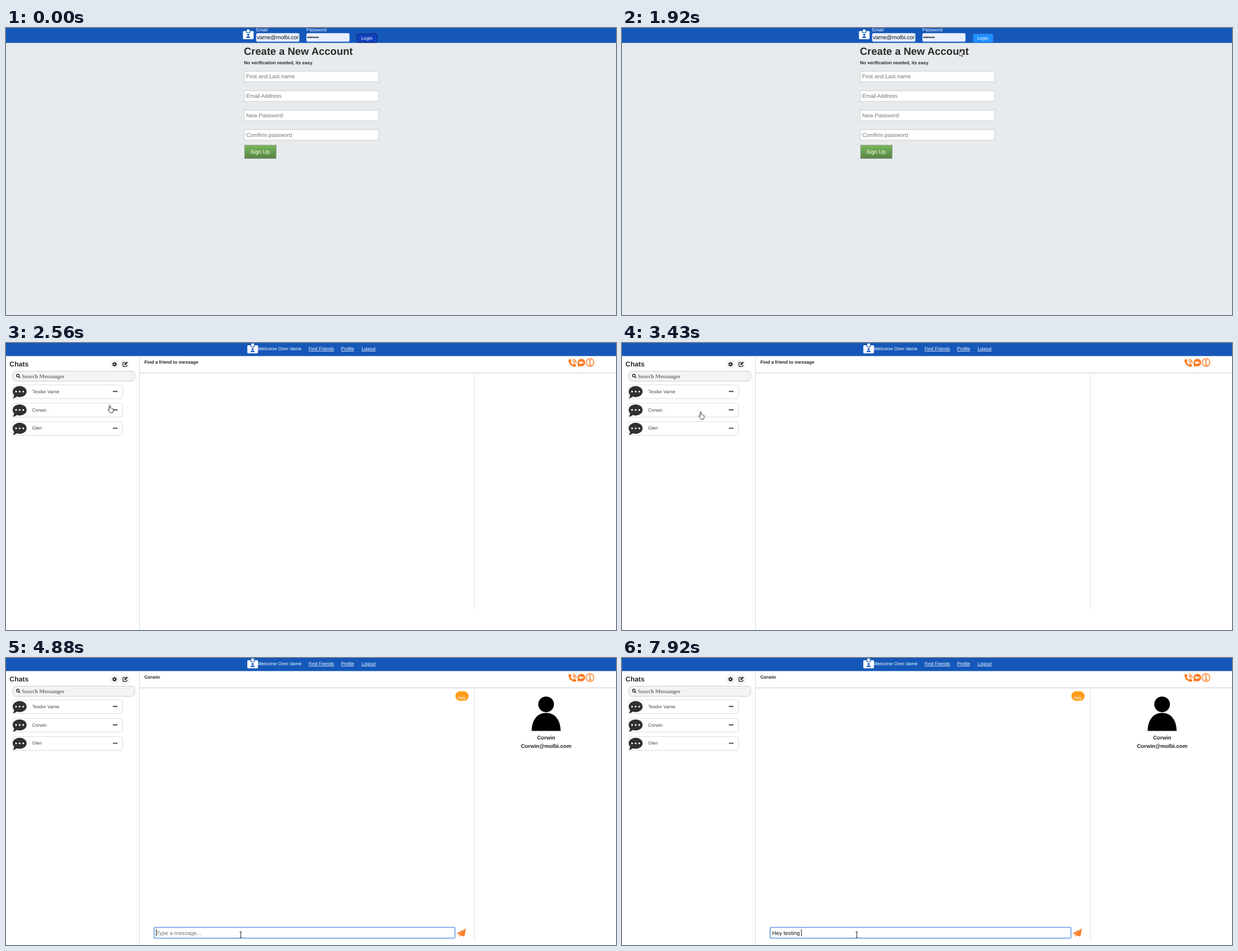
Write an HTML page that moves like this. It is 1090x514 px and loops after 8000 ms.

```html
<!DOCTYPE html>
<html lang="en">
<head>
<meta charset="utf-8">
<title>Chat sign-in and first message</title>
<style>
  html, body { margin: 0; width: 100%; height: 100%; overflow: hidden; background: #fff; }
  svg { display: block; width: 100vw; height: 100vh; }
  text { font-family: "Liberation Sans", Arial, sans-serif; white-space: pre; text-rendering: geometricPrecision; }
  .b { font-weight: bold; }
  .serif { font-family: "Liberation Serif", Times, serif; font-weight: bold; }
  .mid { text-anchor: middle; }
</style>
</head>
<body>
<svg id="stage" viewBox="0 0 1090 514" xmlns="http://www.w3.org/2000/svg"></svg>
<script>
const LOOP = 8000;
const BLUE = '#1558b9', INK = '#2b2b2b', GREY = '#757575', ORANGE = '#fd7c24', LILAC = '#d9d9e8';
const SMALL = 8.2, FIELD = 9.85;

const text = (x, y, size, fill, str, attrs = '') =>
  `<text x="${x}" y="${y}" font-size="${size}" fill="${fill}" ${attrs}>${str}</text>`;
const rect = (x, y, w, h, fill, attrs = '') =>
  `<rect x="${x}" y="${y}" width="${w}" height="${h}" fill="${fill}" ${attrs}/>`;
const circle = (x, y, r, fill, attrs = '') =>
  `<circle cx="${x}" cy="${y}" r="${r}" fill="${fill}" ${attrs}/>`;
const path = (d, fill, attrs = '') => `<path d="${d}" fill="${fill}" ${attrs}/>`;
const stroke = (color, width = 1) => `stroke="${color}" stroke-width="${width}"`;
const group = (id, ...parts) => `<g id="${id}">${parts.join('')}</g>`;
const at = (x, y, body) => `<g transform="translate(${x} ${y})">${body}</g>`;

const badge = (x, y) => at(x, y,
  rect(0, 3, 19, 14.6, '#fff', 'rx="1.5"') +
  rect(5.9, 2.4, 7.2, 4.1, BLUE, 'rx="1"') +
  rect(7.1, 0, 4.8, 5.6, '#fff', 'rx="1"') +
  circle(9.5, 9.8, 1.9, BLUE) +
  path('M5.9 15.3q0-2.7 2.3-2.7h2.6q2.3 0 2.3 2.7z', BLUE));

// Sign-in page
const formRow = (label, i) => {
  const y = 77.5 + i * 34.8;
  return rect(425.7, y, 240, 19, '#fff', stroke('#cbced0')) +
    text(429.2, y + 12.8, FIELD, GREY, label);
};
const loginButton = (id, fill, edge) => group(id,
  rect(627.3, 10.5, 35.8, 15.4, fill, `rx="2.5" ${stroke(edge)}`),
  text(634.8, 20.7, SMALL, '#fff', 'Login'));

const signIn = group('signIn',
  rect(0, 0, 1090, 514, '#e7ebed'),
  rect(0, 0, 1090, 26.7, BLUE),
  badge(423.4, 2.4),
  text(447, 6.4, SMALL, '#fff', 'Email'),
  text(536.8, 6.4, SMALL, '#fff', 'Password'),
  rect(447, 9.2, 77.3, 15.4, '#e8f0fe', 'rx="2.5"'),
  rect(536.8, 9.2, 77, 15.4, '#e8f0fe', 'rx="2.5"'),
  `<g clip-path="url(#emailClip)">${text(448.2, 20.3, FIELD, '#111', 'varne@molbi.com')}</g>`,
  text(538.2, 20.2, FIELD, '#111', '••••••'),
  loginButton('loginIdle', '#123fbd', '#0b2168'),
  loginButton('loginHover', '#1e90ff', '#2f6fe0'),
  text(425, 47.6, 18.5, INK, 'Create a New Account', 'class="b"'),
  text(425.2, 65.2, SMALL, INK, 'No verification needed, its easy', 'class="b"'),
  ['First and Last name', 'Email Address', 'New Password', 'Comfirm password'].map(formRow).join(''),
  rect(426.3, 209.8, 56, 23.6, 'url(#leaf)', stroke('#9aa996', 1.2)),
  path('M426 233.6H482.5V209.6', 'none', stroke('#6c7a68', 1)),
  text(436.4, 224.9, FIELD, '#fff', 'Sign Up'));

// Chat page
const nav = (id, x, name, links) => group(id,
  badge(x, 1),
  text(x + 18.8, 13.2, SMALL, '#fff', 'Welcome ' + name),
  ['Find Friends', 'Profile', 'Logout'].map((label, i) =>
    text(links[i], 13.2, SMALL, '#fff', label, 'text-decoration="underline"')).join(''));

const gear = circle(194, 38, 8.7, '#f4f4f4') +
  circle(194, 38, 2.2, 'none', stroke('#222', 1.8)) +
  circle(194, 38, 3.4, 'none', `${stroke('#222', 1.5)} stroke-dasharray="1.78 1.78"`);
const compose = circle(213, 38, 8.7, '#f4f4f4') +
  path('M213.6 34.8H209.8q-.9 0-.9.9v5.2q0 .9.9.9h5.2q.9 0 .9-.9V38.8', 'none', stroke('#222', 1.2)) +
  path('M211.3 39.6l.4-2 4.2-4.2 1.7 1.7-4.2 4.2z', '#222');

const chatBase = group('chatBase',
  rect(0, 0, 1090, 514, '#fff'),
  rect(0, 0, 1090, 23.4, BLUE),
  text(6.3, 42.2, 12.3, INK, 'Chats', 'class="b"'),
  gear, compose,
  rect(12.5, 50.5, 217.6, 18, '#f4f4f4', `rx="5.5" ${stroke('#cdcdcd')}`),
  circle(21.2, 58.4, 2.4, 'none', stroke('#222', 1.3)),
  path('M23 60.2l2.3 2.3', 'none', stroke('#222', 1.5)),
  text(28.2, 62.8, FIELD, GREY, 'Search Messanger', 'class="serif"'),
  rect(238, 23.4, 1, 490.6, LILAC),
  rect(239, 53, 851, 1, '#c9c9d6'),
  rect(836.5, 54, 1, 422.5, LILAC));

const friend = (name, i) => at(0, i * 32.9,
  rect(12, 74.9, 196.5, 24.7, '#fff', `rx="4" ${stroke(LILAC)}`) +
  path('M14 89Q15.5 96 12 99Q17.5 98.500 20 95z', '#2f3030') +
  `<ellipse cx="24.4" cy="87" rx="12.4" ry="10" fill="#2f3030"/>` +
  [18, 24.4, 30.8].map(x => circle(x, 87, 1.6, '#fff')).join('') +
  text(46.8, 89.7, SMALL, '#444', name) +
  [192.200, 195, 197.8].map(x => circle(x, 86.800, 1.2, '#222')).join(''));

const callIcons = group('callIcons',
  path('M1006 29.500l2.600-1 2 4-1.700 1.700q1.500 3.200 4.400 4.600l1.700-1.800 4 2-.9 2.900q-1 .9-2.900.5-9.200-2.400-10.200-10.600-.1-1.700 1-2.300z', ORANGE),
  path('M1012.500 33.200a3.400 3.400 0 0 1 2.400 3M1012.500 30.800a5.800 5.800 0 0 1 4.700 5.400M1012.500 28.400a8 8 0 0 1 6.900 7.800', 'none', stroke(ORANGE, 1.3)),
  circle(1028.200, 35, 6.700, ORANGE),
  path('M1021.600 36l-.2 6 5-.8z', ORANGE),
  rect(1024.400, 33, 4.800, 4.200, '#fff', 'rx=".8"'),
  path('M1029.500 35l2.400-1.700v3.600z', '#fff'),
  circle(1043.500, 35, 7, 'none', stroke(ORANGE, 1.500)),
  circle(1043.500, 31.200, 1.200, ORANGE),
  path('M1041.500 34h2.300v5.200M1041.300 39.300h4.600', 'none', stroke(ORANGE, 1.500)));

const title = (id, str) => group(id, text(247.200, 37.200, SMALL, '#222', str, 'class="b"'));

const talk = group('talk',
  rect(836.5, 476, 1, 31, LILAC),
  rect(803, 59.400, 23.600, 17.400, '#ff9d1c', 'rx="8.700"'),
  text(808, 73.600, SMALL, '#fff', 'hey'),
  rect(939.5, 130.300, 51.500, 1, '#d3dcea'),
  text(965.200, 145.700, 9.650, '#222', 'Corwin', 'class="b mid"'),
  text(965.200, 160.500, 9.650, '#222', 'Corwin@molbi.com', 'class="b mid"'),
  group('inputIdle', rect(264.7, 482.500, 537.600, 19.200, '#fff', `rx="4" ${stroke('#cfcfcf')}`)),
  group('inputFocus',
    rect(264.7, 482.500, 537.600, 19.200, '#fff', `rx="1.500" ${stroke('#a9c8f3', 2)}`),
    rect(264.7, 482.500, 537.600, 19.200, 'none', `rx="1" ${stroke('#5d94dd', .9)}`)),
  text(268.400, 495.500, FIELD, GREY, 'Type a message...', 'id="hint"'),
  text(268.400, 495.500, FIELD, '#111', '', 'id="typed"'),
  rect(268, 486, 1, 12, '#111', 'id="caret"'));

const loaded = group('loaded',
  circle(965.100, 83, 14, '#000'),
  path('M939.300 130.500C939.500 110 950 98.200 965.100 98.200S990.800 110 991 130.500z', '#000'),
  path('M821.800 484.200L805.400 493.300l4.300 1.900z', ORANGE),
  path('M821.800 484.200L810.300 495.600v4.300l2.800-3.200 6 2.300z', ORANGE));

const pointers = group('pointer',
  group('arrow', path('M.4.4V10.200L2.700 8.100 4.200 11.600 5.700 11 4.200 7.500H7z', '#fff', stroke('#222', .8))),
  group('hand', path('M0 8.500V1.400q0-1 .95-1t.95 1V5.400q1.600-.6 1.900.5q1.400-.5 1.700.6q1.500-.2 1.500 1.200V10q0 2-1 3.800H1.200Q0 11.500-2.200 8.800Q-2.700 7.400-1.500 7.400Q-.7 7.600 0 8.500Z', '#fff', stroke('#222', .9))),
  group('beam', path('M-2-4.800h1.500l.5.500.5-.5H2M0-4.300V5.500M-2 6h1.500l.5-.5.5.5H2', 'none', stroke('#222', 1))));

document.getElementById('stage').innerHTML = `
  <defs>
    <clipPath id="emailClip">${rect(447.8, 9, 75.400, 16, '#000')}</clipPath>
    <linearGradient id="leaf" x1="0" y1="0" x2="0" y2="1">
      <stop offset="0" stop-color="#77b55a"/><stop offset="1" stop-color="#568543"/>
    </linearGradient>
  </defs>` + [
  signIn, chatBase,
  nav('navBlank', 434, 'undefined', [537.800, 596.300, 632.300]),
  nav('navUser', 431.200, 'Oren Varne', [540.700, 598.800, 635.200]),
  group('noFriend', text(6.300, 93.600, 16.450, INK, 'Unable to find friend', 'class="b"')),
  group('friends', ['Teodor Varne', 'Corwin', 'Glen'].map(friend).join('')),
  callIcons, title('titleNone', 'Find a friend to message'), title('titleFriend', 'Corwin'),
  talk, loaded, pointers].join('');

const HOVER = 1180, ENTER = 1970, LIST = 2170, OPEN = 3710, LOADED = 4630, FOCUS = 4830;

// id: [from, to]
const visible = {
  signIn: [0, ENTER], loginIdle: [0, HOVER], loginHover: [HOVER, ENTER],
  chatBase: [ENTER, LOOP], navBlank: [ENTER, LIST], noFriend: [ENTER, LIST],
  navUser: [LIST, LOOP], friends: [LIST, LOOP], callIcons: [LIST, LOOP],
  titleNone: [ENTER, OPEN], titleFriend: [OPEN, LOOP], talk: [OPEN, LOOP],
  loaded: [LOADED, LOOP], inputIdle: [OPEN, FOCUS], inputFocus: [FOCUS, LOOP]
};

const typing = [
  [0, ''], [5600, 'H'], [5900, 'He'], [6140, 'H'], [6290, ''], [6440, 'H'], [6640, 'He'],
  [6780, 'Hey'], [6870, 'Hey '], [7330, 'Hey t'], [7430, 'Hey te'], [7520, 'Hey tes'],
  [7620, 'Hey test'], [7720, 'Hey testin'], [7820, 'Hey testing'], [7920, 'Hey testing ']
];

// Pointer track: time, x, y
const track = [
  [140, 949, 473], [300, 890, 375], [500, 780, 205], [700, 690, 88], [930, 640, 28],
  [1080, 641, 27], [1400, 646, 16], [1820, 646, 16], [1870, 632, 26], [1920, 603, 40.300],
  [1970, 556, 60], [2120, 415, 92], [2320, 265, 112], [2500, 195, 112], [2660, 167, 109.500],
  [2710, 165, 110], [3150, 142, 123.500], [3370, 140.500, 123], [3430, 139, 122.500],
  [3660, 139, 122.500], [3810, 134, 142], [3960, 160, 230], [4120, 250, 385], [4330, 380, 530],
  [4530, 400, 530], [4580, 404, 511], [4880, 419.500, 495]
];

function pointerAt(t) {
  const step = 49.4;
  const q = Math.round((140 + Math.floor((t - 138) / step) * step) / 10) * 10;
  const i = track.findIndex(p => p[0] > q);
  if (i < 0) return track[track.length - 1].slice(1);
  const [t0, x0, y0] = track[Math.max(i - 1, 0)], [t1, x1, y1] = track[i];
  const u = Math.max(0, (q - t0) / (t1 - t0 || 1));
  return i ? [x0 + (x1 - x0) * u, y0 + (y1 - y0) * u] : [x1, y1];
}

const inside = (x, y, l, top, r, bottom) => x >= l && x <= r && y >= top && y <= bottom;

function pointerKind(t, x, y) {
  if (t < ENTER) return inside(x, y, 627, 10, 663, 26) ? 'hand' : 'arrow';
  if (t >= LIST && [75, 107.5, 140.5].some(top => inside(x, y, 12, top, 208, top + 25.500))) return 'hand';
  return t >= OPEN && inside(x, y, 264, 482, 802, 502) ? 'beam' : 'arrow';
}

const el = id => document.getElementById(id);
const show = (id, on) => { el(id).style.display = on ? '' : 'none'; };

function draw(t) {
  for (const id in visible) show(id, t >= visible[id][0] && t < visible[id][1]);

  const typed = typing.filter(s => s[0] <= t).pop()[1];
  el('typed').textContent = typed;
  show('hint', !typed);
  show('caret', t >= FOCUS && !(t >= 5330 && t < 5600));
  const width = typed ? el('typed').getComputedTextLength() : 0;
  el('caret').setAttribute('x', Math.round(268.2 + width));

  const [x, y] = pointerAt(t);
  const kind = pointerKind(t, x, y);
  show('pointer', t >= 140);
  ['arrow', 'hand', 'beam'].forEach(id => show(id, id === kind));
  el('pointer').setAttribute('transform', `translate(${x} ${y})`);
}

const start = performance.now();
function tick() {
  draw((performance.now() - start) % LOOP);
  requestAnimationFrame(tick);
}
tick();
</script>
</body>
</html>
```
